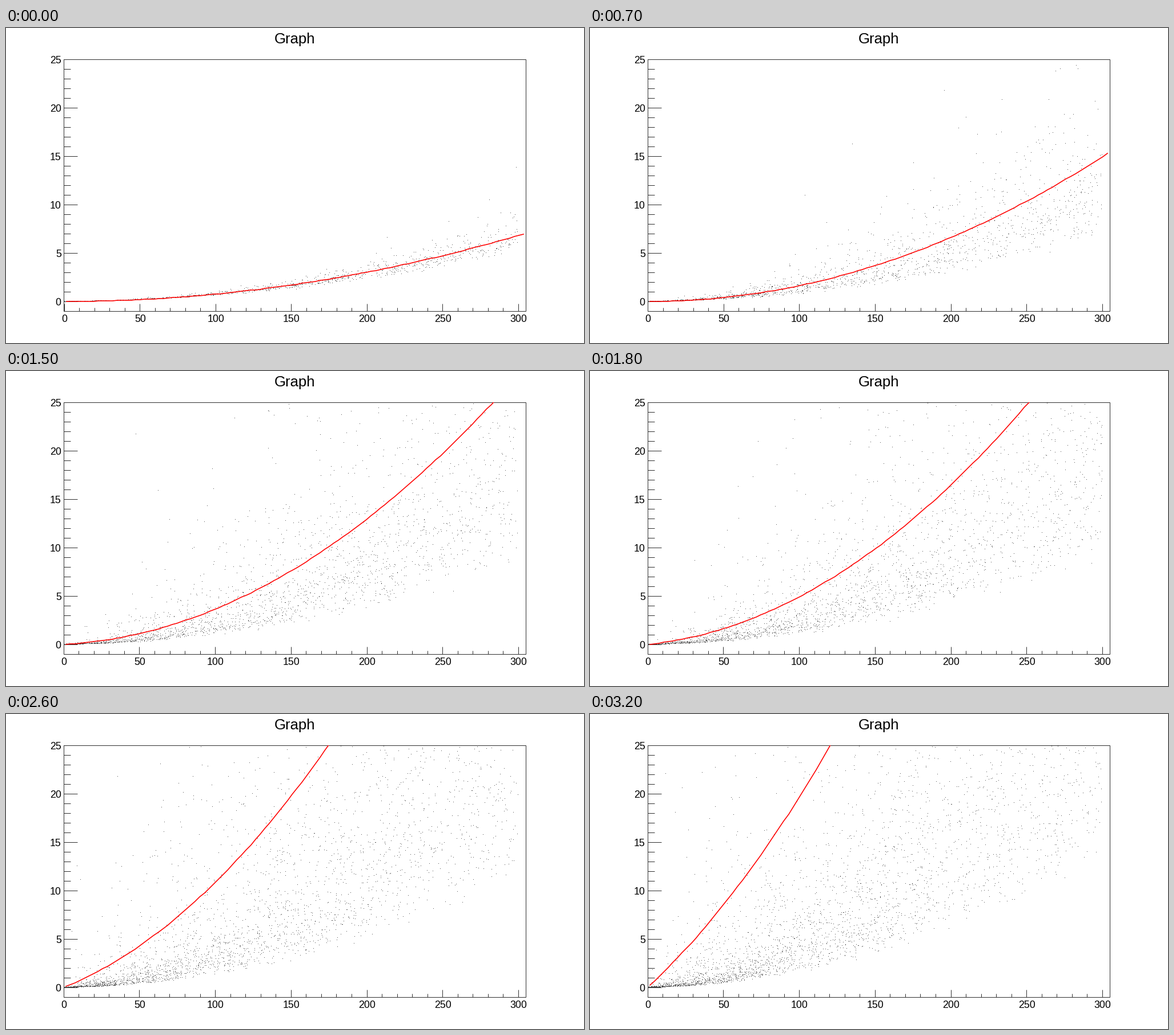
A matplotlib script that plays this animation: 1012x553 px, repeating every 3300 ms.

```python
import numpy as np
import matplotlib.pyplot as plt
from matplotlib.animation import FuncAnimation
from matplotlib.collections import LineCollection
from matplotlib.patches import Rectangle

W, H, DPI = 1012, 553, 64
FRAMES, INTERVAL = 33, 100
LEFT, RIGHT, TOP, BOTTOM = 101, 910, 55, 497
PX = 72 / DPI  # points per pixel
INK, DOT = "#303030", "#505050"


def zero_x(i):
    """Pixel of x = 0; the axis start settles as data comes in."""
    return 100.6 + 1.2 * np.exp(-i / 6)


def to_x(v, i):
    x0 = zero_x(i)
    return x0 + (897 - x0) * v / 300


def to_y(v):
    return 480 - 17 * v


def fit(x, i):
    """Parabola through the origin, set by its heights at 100 and 200."""
    bump = np.sin(np.pi * np.sqrt(i / (FRAMES - 1)))
    y1 = 0.75 * np.exp(0.102 * i + 0.06 * bump)
    y2 = 3.02 * np.exp(0.0875 * i + 0.17 * bump)
    u = x / 100
    return u * ((4 * y1 - y2) / 2 + (y2 - 2 * y1) / 2 * u)


def scatter(i):
    """Random parabolas: a rising floor plus a spread with a growing tail."""
    t = i / (FRAMES - 1)
    rng = np.random.default_rng(100 + i)
    n = int(900 + 3600 * t ** 1.3)
    x = rng.uniform(0, 300, n)
    low = 0.45 * np.exp(0.034 * i)
    spread = (0.28 + 1.1 * t ** 0.8) * rng.lognormal(0, 0.4 + 0.4 * t ** 0.5, n)
    spread *= rng.uniform(1e-6, 1, n) ** (-1.7 * t)
    y = (low + spread) * 1e-4 * x ** 2
    keep = y < 24.9
    return x[keep], y[keep]


fig = plt.figure(figsize=(W / DPI, H / DPI), dpi=DPI, facecolor="white")
ax = fig.add_axes([0, 0, 1, 1])
ax.set_xlim(0, W)
ax.set_ylim(H, 0)
ax.axis("off")


def label(x, y, text, size, ha):
    return ax.text(x, y, text, fontsize=size * PX, ha=ha, va="baseline",
                   family="Liberation Sans", color="black")


def ticks(segments):
    return ax.add_collection(
        LineCollection(segments, colors=INK, linewidths=PX))


label(505.8, 26.5, "Graph", 25.7, "center")

# Frame and y axis
ax.add_patch(Rectangle((LEFT, TOP), RIGHT - LEFT, BOTTOM - TOP, fill=False,
                       ec=INK, lw=PX, snap=True))
ticks([[(LEFT, to_y(v)), (LEFT + (12 if v % 5 else 24), to_y(v))]
       for v in range(26)])
for v in range(0, 26, 5):
    label(96.7, to_y(v) + 6.6, str(v), 17.8, "right")

x_values = np.arange(0, 301, 10)
x_ticks = ticks([])
x_labels = [(v, label(0, 516, str(v), 17.8, "center"))
            for v in range(0, 301, 50)]

dots, = ax.plot([], [], ",", color=DOT, zorder=2)
curve, = ax.plot([], [], color="red", lw=1.6 * PX, zorder=3)
curve.set_clip_path(Rectangle((LEFT, TOP), RIGHT - LEFT, BOTTOM - TOP,
                              transform=ax.transData))


def draw(i):
    x_ticks.set_segments([
        [(x, BOTTOM), (x, BOTTOM - (6 if v % 50 else 13))]
        for v, x in zip(x_values, np.round(to_x(x_values, i)))])
    for v, text in x_labels:
        text.set_x(to_x(v, i) + 0.5)

    x, y = scatter(i)
    dots.set_data(np.round(to_x(x, i)), np.round(to_y(y)))

    x = (np.arange(100) + 0.5) * 3.05
    curve.set_data(np.round(to_x(x, i)), np.round(to_y(fit(x, i))))
    return dots, curve, x_ticks


anim = FuncAnimation(fig, draw, frames=FRAMES, interval=INTERVAL,
                     init_func=lambda: draw(0), repeat=True, repeat_delay=0,
                     blit=False)
plt.show()
```
